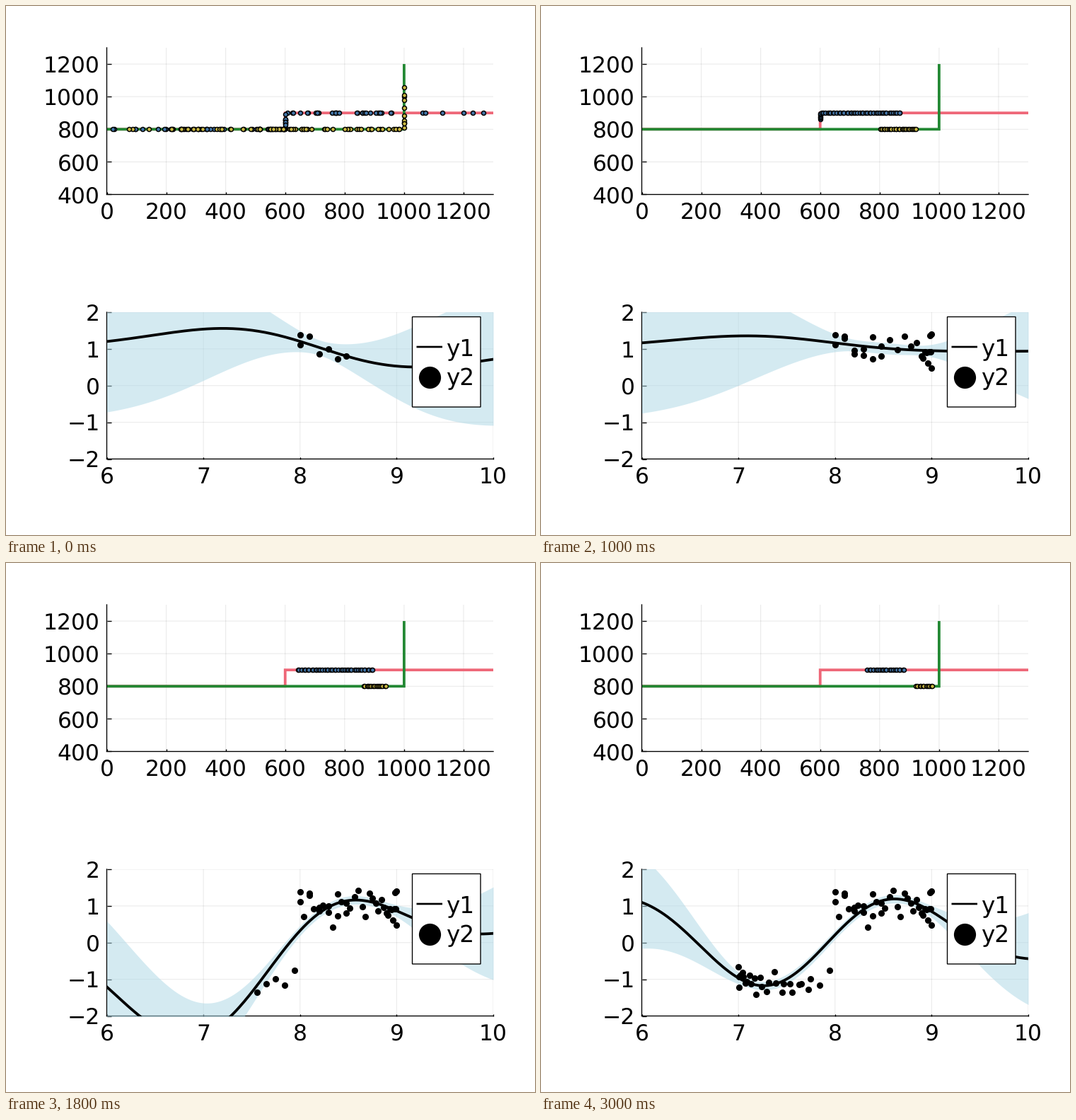
These frames come from a looping animation (748x748 px, 3.05 s). A matplotlib script:

```python
import matplotlib.pyplot as plt
import numpy as np
from matplotlib.animation import FuncAnimation
from matplotlib.patches import Rectangle

SIZE, DPI, FRAMES = 748, 100, 61
PX = 72 / DPI
BLUE, YELLOW, RED, GREEN = "#4477AA", "#CCBB44", "#EE6677", "#228833"
plt.rcParams.update({"font.family": "DejaVu Sans", "path.snap": False,
                     "text.hinting": "none"})
rng = np.random.default_rng(4)

# Measurements: a short warm-up sweep, then one reading per step.
WARM_UP = [1.38, 1.34, .87, .99, .72, .80]
STEP = np.arange(FRAMES)
LEVEL = np.interp(STEP, [0, 7, 13, 17, 20, 25, 28, 31, 32, 41, 44, 50, 60],
                  [1.05, 1.18, .85, 1.1, .75, 1.2, .76, .91,
                   -1.05, -1.23, -.95, -.9, -1.25])
SCATTER = np.diff(rng.normal(0, 0.12, FRAMES + 1))
OBS_X = 8 + np.sin(0.1 * np.r_[STEP[:len(WARM_UP)], STEP])
OBS_Y = np.r_[WARM_UP, LEVEL + SCATTER]
GRID = np.linspace(6, 10, 240)
NOISE = 0.27

# Particles, as distance travelled along each route. The first few frames
# show a broad cloud; afterwards only those inside a moving window survive.
COLLAPSE = 5
KEYS = [0, 8, 26, 32, 41, 49, 60]
BLUE_WINDOW = ([0, 675, 655, 743, 733, 738, 858],
               [1400, 1060, 938, 885, 1142, 1118, 988])
YELLOW_WINDOW = ([0, 805, 795, 815, 918, 922, 918],
                 [1400, 895, 937, 904, 998, 996, 978])


def clouds(count, first, last, gap):
    spread = rng.normal(600, 340, count)
    pool = np.arange(first, last, gap)
    return spread, pool + rng.uniform(-0.45, 0.45, len(pool)) * gap


BLUE_CLOUDS = clouds(95, 658, 1145, 6.5)
YELLOW_CLOUDS = clouds(85, 797, 998, 5.5)


def survivors(n, group, window):
    s = group[0] if n < COLLAPSE else group[1]
    low, high = (np.interp(n, KEYS, edge) for edge in window)
    return s[(s >= low) & (s <= high)]


def blue_xy(s):
    return np.where(s < 600, s, np.maximum(600, s - 100)), 800 + np.clip(s - 600, 0, 100)


def yellow_xy(s):
    return np.minimum(s, 1000), 800 + np.maximum(s - 1000, 0)


def kernel(a, b):
    return np.exp(-0.5 * (a[:, None] - b[None, :]) ** 2)


def posterior(x, y):
    mean = y.mean()
    gram = kernel(x, x) + NOISE ** 2 * np.eye(len(x))
    cross = kernel(GRID, x)
    weights = np.linalg.solve(gram, cross.T)
    mu = mean + weights.T @ (y - mean)
    var = 1 - np.sum(cross * weights.T, axis=1)
    return mu, 1.96 * np.sqrt(np.maximum(var, 0))


def panel(top, bottom, xlim, ylim, xticks, yticks):
    left, right = 142.5, 689
    ax = fig.add_axes([left / SIZE, 1 - bottom / SIZE,
                       (right - left) / SIZE, (bottom - top) / SIZE])
    ax.set(xlim=xlim, ylim=ylim, xticks=xticks, yticks=yticks)
    ax.set_xticklabels([str(v) for v in xticks])
    ax.set_yticklabels([str(v).replace("-", "\u2212") for v in yticks])
    ax.set_axisbelow(True)
    ax.patch.set_visible(False)
    ax.spines[["top", "right"]].set_visible(False)
    ax.spines[["left", "bottom"]].set_linewidth(1.35 * PX)
    ax.grid(color="black", alpha=0.09, linewidth=1 * PX)
    ax.tick_params(direction="in", width=1.35 * PX, labelsize=31.4 * PX)
    ax.tick_params(axis="x", length=3 * PX, pad=10.5 * PX)
    ax.tick_params(axis="y", length=6 * PX, pad=10 * PX)
    return ax


def particles(color, z):
    return route.plot([], [], "o", ms=6 * PX, mfc=color, mec="black",
                      mew=1.5 * PX, clip_on=False, zorder=z)[0]


def legend():
    put = dict(transform=None, zorder=10, clip_on=False)
    fig.add_artist(Rectangle((574.5, SIZE - 567), 96.5, 127.5, fc="white",
                             ec="black", lw=1.35 * PX, **put))
    fig.add_artist(plt.Line2D([580.5, 617], [SIZE - 482] * 2, color="black",
                              lw=2.7 * PX, solid_capstyle="butt", **put))
    fig.add_artist(plt.Line2D([598.7], [SIZE - 524.5], marker="o", color="black",
                              ms=31.2 * PX, mew=0, **put))
    for label, y in (("y1", 494.5), ("y2", 536.5)):
        fig.text(622 / SIZE, 1 - y / SIZE, label, fontsize=32.6 * PX,
                 va="baseline", zorder=11)


fig = plt.figure(figsize=(SIZE / DPI, SIZE / DPI), dpi=DPI, facecolor="white")

route = panel(59, 266.5, (0, 1300), (400, 1300),
              range(0, 1201, 200), range(400, 1201, 200))
line = dict(lw=3.8 * PX, solid_capstyle="butt", solid_joinstyle="miter")
route.plot([0, 600, 600, 1300], [800, 800, 900, 900], color=RED, zorder=3, **line)
route.plot([0, 1000, 1000], [800, 800, 1200], color=GREEN, zorder=4, **line)
blue, yellow = particles(BLUE, 5), particles(YELLOW, 6)

field = panel(433, 640.5, (6, 10), (-2, 2), range(6, 11), range(-2, 3))
band = field.fill_between(GRID, GRID * 0, GRID * 0, color="lightblue",
                          alpha=0.52, lw=0, zorder=3)
curve, = field.plot([], [], color="black", lw=3.8 * PX, zorder=4)
dots, = field.plot([], [], "o", color="black", ms=9.1 * PX, mew=0, zorder=5)
legend()


def update(n):
    blue.set_data(*blue_xy(survivors(n, BLUE_CLOUDS, BLUE_WINDOW)))
    yellow.set_data(*yellow_xy(survivors(n, YELLOW_CLOUDS, YELLOW_WINDOW)))
    seen = len(WARM_UP) + n + 1
    x, y = OBS_X[:seen], OBS_Y[:seen]
    mu, half = posterior(x, y)
    upper = np.column_stack([GRID, mu + half])
    lower = np.column_stack([GRID, mu - half])
    band.set_verts([np.vstack([upper, lower[::-1]])])
    curve.set_data(GRID, mu)
    dots.set_data(x, y)
    return blue, yellow, band, curve, dots


anim = FuncAnimation(fig, update, frames=FRAMES, interval=50,
                     repeat=True, repeat_delay=0, blit=False)
plt.show()
```
